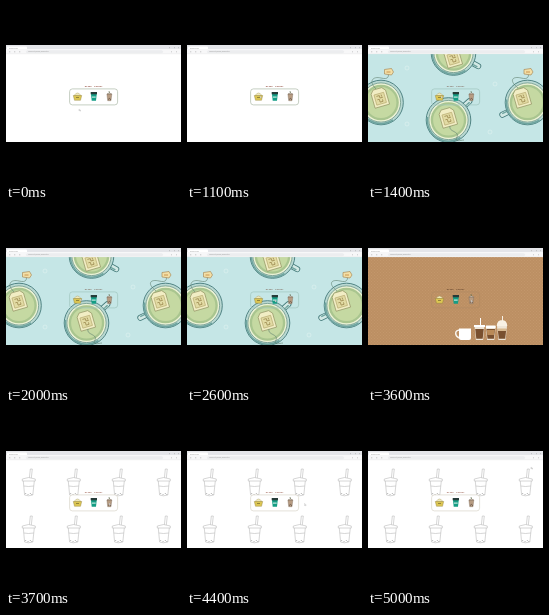
Write an HTML page that moves like this. It is 175 px wide and 175 px high and loops after 5.1 s.

```html
<!DOCTYPE html>
<html lang="en">
<head>
<meta charset="utf-8">
<title>Drink Picker</title>
<style>
html, body { margin: 0; width: 100%; height: 100%; overflow: hidden; background: #000; }
svg { display: block; width: 100%; height: 100%; }
text { font-family: "Liberation Mono", monospace; white-space: pre; }
.ui { font-family: Roboto, sans-serif; font-size: 1.7px; fill: #999; }
</style>
</head>
<body>
<svg viewBox="0 0 175 175">
  <defs>
    <pattern id="weave" width="3" height="3" patternUnits="userSpaceOnUse">
      <path d="M0 .5h1M1.5 2h1" stroke="#c79c71" stroke-width=".6"/>
    </pattern>
    <g id="teaCup">
      <circle r="22.3" fill="#b9d8d2" stroke="#447a7a" stroke-width=".9"/>
      <path d="M-21 -3A21.2 21.2 0 0 0 12 17.5" fill="none" stroke="#6fa5a0" stroke-width="1.6"/>
      <circle r="19.6" fill="#ecf2d6" stroke="#648f82" stroke-width=".7"/>
      <circle r="17.8" fill="#a9c58f"/>
      <circle r="15.4" fill="#c5d9a2"/>
    </g>
    <g id="handle" fill="none" stroke-linecap="round">
      <path d="M19 0H28" stroke="#447a7a" stroke-width="6"/>
      <path d="M19 0H28" stroke="#d3e9e5" stroke-width="4.4"/>
      <path d="M19 1H27" stroke="#6fa5a0" stroke-width="1.5"/>
    </g>
    <g id="teaBag" stroke-width=".6">
      <path d="M-7.5 -6L-4.5 -9.5H4.5L7.5 -6V8.5H-7.5Z" fill="#f1edc4" stroke="#8b8c5c"/>
      <path d="M-5 -4.5H5V6H-5Z" fill="#e2dba4" stroke="#b3a56c"/>
      <path d="M-3 -2.5H0V0H3M-3 1H-1V4H2V2M2 -3V-1" fill="none" stroke="#a08f55" stroke-width=".8"/>
    </g>
    <g id="tag">
      <path d="M-4 -2.5L3 -3.5L5 0L3 3L-4 2Z" fill="#f3dfa6" stroke="#a17d49" stroke-width=".6"/>
      <path d="M-2 0H2" stroke="#c58d49" stroke-width=".9"/>
    </g>
    <g id="boba" fill="none" stroke="#b4b4b4" stroke-width=".55">
      <path d="M1.1 -8L2 -17H4L3 -8" fill="#fff"/>
      <path d="M-6 -7Q0 -10 7 -7V-5H-6Z" fill="#fff"/>
      <path d="M-5 -5L-3.7 9Q0 10.6 4.5 9L6 -5M-4.5 0Q0 1 5.5 0"/>
      <path d="M-2.7 7.5h.1M-.3 8.5h.1M2 7.5h.1M3.5 8.5h.1" stroke-width="1.2" stroke-linecap="round"/>
    </g>
    <g id="takeaway">
      <path d="M-5 0H5L3.6 14H-3.6Z" fill="#eee5d7"/>
      <path d="M-4.3 3H4.3L3.2 12.7H-3.2Z" fill="#79502f"/>
    </g>
    <clipPath id="page"><path d="M0 48H175V136H0Z"/></clipPath>
  </defs>

  <rect width="175" height="175"/>
  <rect y="39" width="175" height="97" fill="#fff"/>

  <g clip-path="url(#page)">
    <g id="tea">
      <path d="M0 48H175V136H0Z" fill="#c5e6e6"/>
      <g fill="none" stroke="#ddf1ef" stroke-width=".7">
        <circle cx="39" cy="62" r="2"/><circle cx="39" cy="118" r="2"/>
        <circle cx="127" cy="78" r="2"/><circle cx="122" cy="126" r="2"/>
      </g>
      <g id="cups"></g>
      <g fill="none" stroke="#61806f" stroke-width=".6">
        <path d="M8 83C0 75 5 70 13 72S21 70 20 66"/>
        <path d="M150 82C140 74 145 70 153 72S161 70 160 66"/>
        <path d="M82 120C80 126 92 125 89 131S93 134 96 134"/>
      </g>
      <use href="#tag" x="20.5" y="66"/>
      <use href="#tag" x="160" y="66"/>
    </g>

    <g id="coffee">
      <path d="M0 48H175V136H0Z" fill="#bc8f63"/>
      <path d="M0 48H175V136H0Z" fill="url(#weave)"/>
      <path d="M91 121Q86 122 88.5 127Q90 129 93 129" fill="none" stroke="#f7f4ee" stroke-width="1.5"/>
      <path d="M91 119.5H103V129Q103 131 101 131H93Q91 131 91 129Z" fill="#fff"/>
      <use href="#takeaway" x="111.5" y="117"/>
      <path d="M106 116H117V118H106ZM112 109h1v8h-1z" fill="#fff"/>
      <use href="#takeaway" x="122.7" y="117"/>
      <path d="M118 116.5H127.5V119H118Z" fill="#fff"/>
      <path d="M118.8 121H126.7L126 126H119.4Z" fill="#b98a58"/>
      <use href="#takeaway" x="134" y="117"/>
      <path d="M128.7 117Q129 111 134 111T139.3 117ZM134 107h1v6h-1z" fill="#f8f1e5"/>
      <path d="M129.7 119.5H138.3L138 122H130Z" fill="#d8b990"/>
    </g>

    <g id="milkTea"></g>
  </g>

  <rect id="card" x="63.6" y="82.9" width="48" height="16" rx="2.8" stroke-width=".7"/>
  <text id="title" x="78.7" y="80.8" font-size="2.3" font-weight="700">Drink  Picker</text>

  <g id="icons">
    <path d="M68 89.5Q71.5 84.5 75 89.5Z" fill="#efe9bd" stroke="#a89a5a" stroke-width=".4"/>
    <path d="M67.3 89.5H75.7L74.5 94.3H68.5Z" fill="#dcc653" stroke="#8b7c3c" stroke-width=".4"/>
    <path d="M70 91.5H73" stroke="#75682f" stroke-width=".7"/>
    <path d="M85 88H90.7L90 94.7H85.7Z" fill="#139d84"/>
    <path d="M84.7 86H91V88.3H84.7Z" fill="#263b38"/>
    <path d="M86 90.3H89.7V92H86Z" fill="#8fd3c4"/>
    <path d="M103 85L103.8 88" stroke="#657354" stroke-width=".7"/>
    <path d="M100.9 88H105.8L105 94.7H101.7Z" fill="#b79c82" stroke="#7d6a5b" stroke-width=".4"/>
    <path d="M101 88Q103.3 85.8 105.7 88Z" fill="#ded6ca" stroke="#7d6a5b" stroke-width=".4"/>
    <path d="M102.4 93.2h.1M103.6 92.4h.1M104.5 93.4h.1" stroke="#5a483d" stroke-width=".8" stroke-linecap="round"/>
  </g>

  <g id="browser">
    <path d="M0 39H175V43H0Z" fill="#e4e5e9"/>
    <path d="M1 43V41.2Q1 40.4 2 40.4H20Q21 40.4 21 41.2V43Z" fill="#fff"/>
    <path d="M0 43H175V48H0Z" fill="#f7f7f8"/>
    <rect x="20" y="44.2" width="137" height="3" rx="1.5" fill="#ecedef"/>
    <path d="M0 47.8H175" stroke="#dedfe2" stroke-width=".35"/>
    <text class="ui" x="3" y="42.6">Drink Picker</text>
    <text class="ui" x="22" y="46.4">localhost/drinks/index.html</text>
    <path d="M3 45.8h1.3M8 45.8h1.3M13 45.8h1.3M165 45.8h1M170 45.8h1M163 41.7h1M168 41.7h1M172 41.7h1" stroke="#959595" stroke-width=".5"/>
  </g>
  <path id="cursor" d="M0 0V2L.6 1.5L1 2.3L1.4 2.1L1 1.4H1.7Z" fill="#fff" stroke="#888" stroke-width=".25"/>
</svg>
<script>
const LOOP = 5100;
const el = id => document.getElementById(id);

// cup x, y, handle angle, bag x, y
const cups = [
  [13, 96.5, 150, 12, 92], [85.5, 47, 28, 85, 52],
  [80.5, 114, -42, 80, 112], [159.5, 96.5, 154, 154, 92]
];
el("cups").innerHTML = cups.map(([x, y, angle, bagX, bagY]) => `
  <g transform="translate(${x} ${y})">
    <use href="#handle" transform="rotate(${angle})"/>
    <use href="#teaCup"/>
  </g>
  <use href="#teaBag" transform="translate(${bagX} ${bagY}) rotate(-16)"/>`).join("");

let tiles = '<path d="M0 48H175V136H0Z" fill="#fff"/>';
for (let i = 0; i < 8; i++) {
  tiles += `<use href="#boba" x="${22.3 + i % 4 * 45}" y="${74 + (i >> 2) * 47}"/>`;
}
el("milkTea").innerHTML = tiles;

const scenes = [
  { start: 0, fill: "#fff", border: "#aebaa9", title: "#914d3e" },
  { start: 1400, layer: "tea", fill: "none", border: "#a0c4bd", title: "#857064" },
  { start: 2700, layer: "coffee", fill: "none", border: "#b08a63", title: "#65452e" },
  { start: 3700, layer: "milkTea", fill: "#fff", border: "#d9d4c9", title: "#a3685b" }
];

// time, x, y
const cursorPath = [
  [0, 73, 103], [400, 73, 103], [700, 32, 102], [1100, 73, 90], [1900, 73, 90],
  [2500, 88, 91], [2900, 88, 91], [3500, 103, 91], [4300, 103, 91],
  [4500, 132, 92], [4700, 162, 59], [5000, 163, 55], [LOOP, 163, 55]
];

function cursorAt(t) {
  const next = cursorPath.findIndex(key => key[0] > t);
  const [t0, x0, y0] = cursorPath[next - 1];
  const [t1, x1, y1] = cursorPath[next];
  const p = (t - t0) / (t1 - t0);
  const ease = p * p * (3 - 2 * p);
  return [x0 + (x1 - x0) * ease, y0 + (y1 - y0) * ease];
}

function draw(now) {
  const t = Math.floor(now % LOOP / 100) * 100;
  const scene = scenes.findLast(s => s.start <= t);
  for (const { layer } of scenes) {
    if (layer) el(layer).style.display = layer === scene.layer ? "" : "none";
  }
  el("card").setAttribute("fill", scene.fill);
  el("card").setAttribute("stroke", scene.border);
  el("title").setAttribute("fill", scene.title);
  // The pointer drops out of view while it crosses the page quickly.
  el("cursor").style.display = t >= 4600 && t < 4800 ? "none" : "";
  el("cursor").setAttribute("transform", `translate(${cursorAt(t)})`);
}

const begin = performance.now();
function tick() {
  draw(performance.now() - begin);
  requestAnimationFrame(tick);
}
tick();
</script>
</body>
</html>
```
